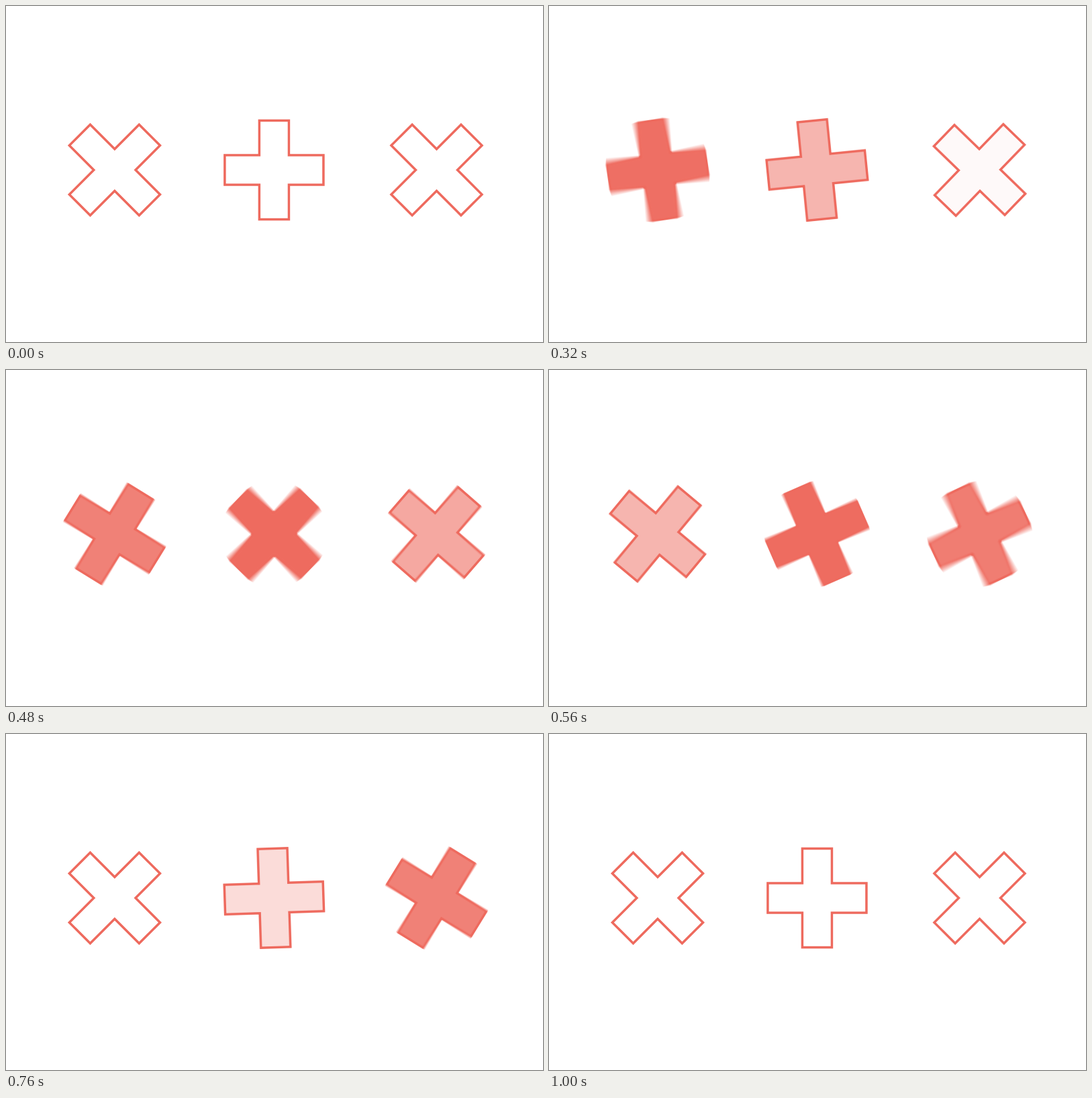
An HTML page with a canvas for the animation above (1640 ms loop, 800 px wide and 500 px high).

```html
<!DOCTYPE html>
<html lang="en">
<head>
<meta charset="utf-8">
<title>Turning crosses</title>
<style>
  html, body { margin: 0; width: 100%; height: 100%; overflow: hidden; background: #fff; }
  canvas { display: block; width: 800px; height: 500px; }
</style>
</head>
<body>
<canvas id="stage" width="800" height="500"></canvas>
<script>
const LOOP = 1640, STEP = 40;
const RED = '#ee6a5e', LINE = 3.5;
const ARM = 73.5, HALF = 22;
const SAMPLES = 15, SHUTTER = 0.5;

// delay is counted in steps of 40 ms
const crosses = [
  { x: 161.9, base: 45, delay: 0 },
  { x: 399.4, base: 0, delay: 3.5 },
  { x: 641.5, base: 45, delay: 7 }
];
const CY = 244;

// Wind back, swing through a quarter turn, settle
const WIND = 4.1, END = 18, BACK = -6.1, TURN = 90;
const FULL = 9, FADE = 10;

const ctx = document.getElementById('stage').getContext('2d');
const layer = document.createElement('canvas');
const SIZE = layer.width = layer.height = 180;
const pen = layer.getContext('2d');

const clamp = v => Math.min(1, Math.max(0, v));
const smooth = v => { v = clamp(v); return v * v * (3 - 2 * v); };

// Cubic bezier (x1, 0, x2, 1)
function swing(u, x1 = 0.275, x2 = 0.205) {
  u = clamp(u);
  let lo = 0, hi = 1;
  for (let i = 0; i < 24; i++) {
    const s = (lo + hi) / 2, r = 1 - s;
    if (3 * r * r * s * x1 + 3 * r * s * s * x2 + s * s * s < u) lo = s;
    else hi = s;
  }
  return smooth(lo);
}

function angle(n) {
  if (n < WIND) return BACK * smooth(n / WIND);
  return BACK + (TURN - BACK) * swing((n - WIND) / (END - WIND));
}

const fillAmount = n => n < FADE ? smooth(n / FULL) : 1 - smooth((n - FADE) / (END - FADE));

function plus(grow) {
  const a = ARM + grow, h = HALF + grow;
  const p = new Path2D();
  p.rect(-h, -a, 2 * h, 2 * a);
  p.rect(-a, -h, 2 * a, 2 * h);
  return p;
}
const outer = plus(LINE / 2), inner = plus(-LINE / 2);

// Average the shape over the shutter time, then tint and place it
function blurred(cross, n, path, color, alpha) {
  pen.setTransform(1, 0, 0, 1, 0, 0);
  pen.clearRect(0, 0, SIZE, SIZE);
  pen.globalCompositeOperation = 'lighter';
  pen.globalAlpha = 1 / SAMPLES;
  const left = Math.floor(cross.x) - SIZE / 2, top = CY - SIZE / 2;
  for (let i = 0; i < SAMPLES; i++) {
    const at = n + (i / (SAMPLES - 1) - 0.5) * SHUTTER;
    pen.setTransform(1, 0, 0, 1, cross.x - left, CY - top);
    pen.rotate((cross.base + angle(at)) * Math.PI / 180);
    pen.fill(path);
  }
  pen.setTransform(1, 0, 0, 1, 0, 0);
  pen.globalCompositeOperation = 'source-in';
  pen.globalAlpha = 1;
  pen.fillStyle = color;
  pen.fillRect(0, 0, SIZE, SIZE);
  ctx.globalAlpha = alpha;
  ctx.drawImage(layer, left, top);
}

function draw(ms) {
  const step = Math.floor(ms % LOOP / STEP);
  ctx.globalAlpha = 1;
  ctx.fillStyle = '#fff';
  ctx.fillRect(0, 0, 800, 500);
  for (const c of crosses) {
    const n = step - c.delay;
    blurred(c, n, outer, RED, 1);
    blurred(c, n, inner, '#fff', 1 - fillAmount(n));
  }
}

const start = performance.now();
function tick() {
  draw(Math.max(0, performance.now() - start));
  requestAnimationFrame(tick);
}
tick();
</script>
</body>
</html>
```
